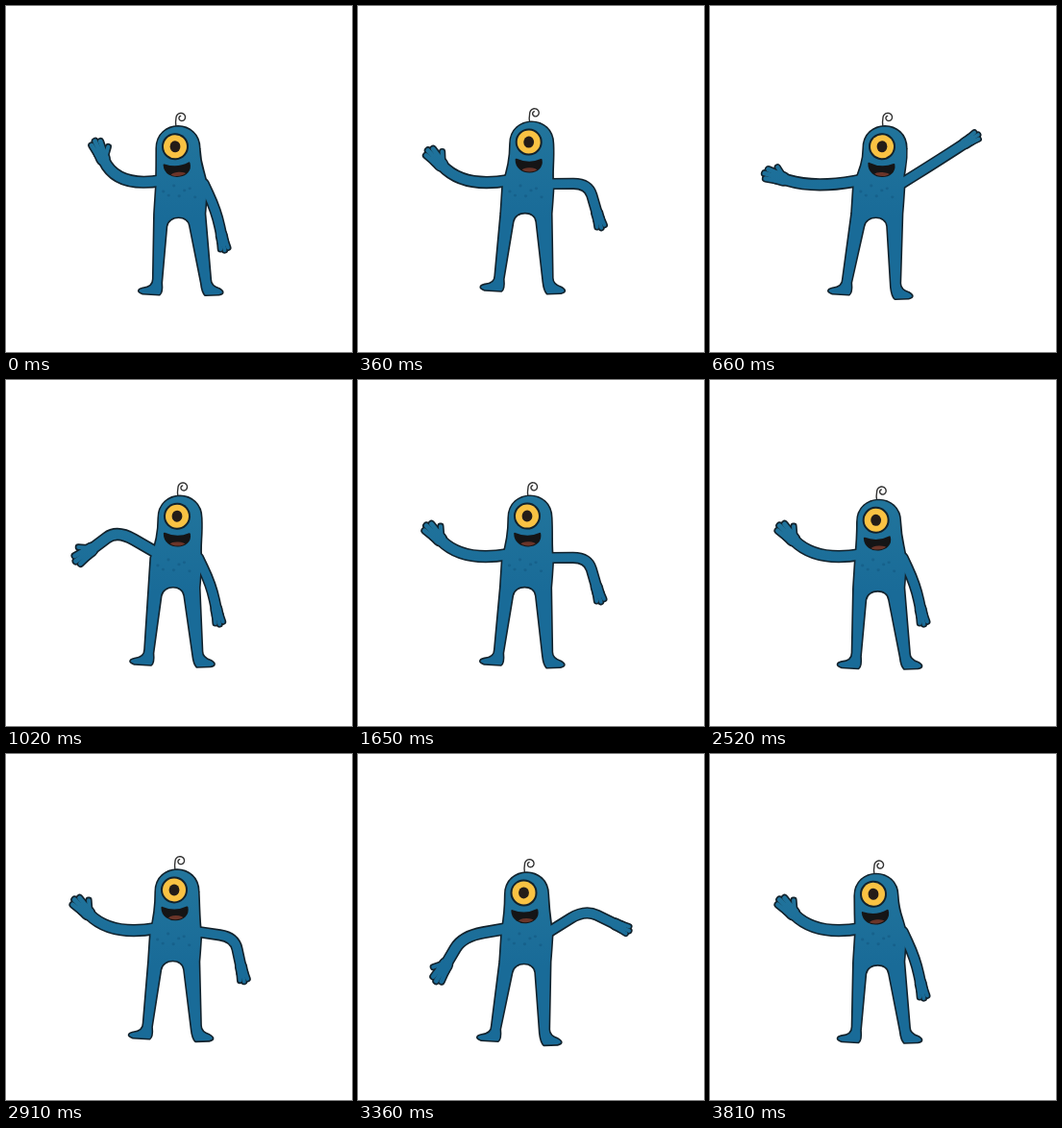
Recreate the animation shown at these times as an HTML page with a canvas. Size 360 by 360 pixels, loop 3870 ms.

```html
<!DOCTYPE html>
<html lang="en">
<head>
<meta charset="utf-8">
<title>Waving monster</title>
<style>
  html, body { margin: 0; width: 100%; height: 100%; overflow: hidden; background: #fff; }
  canvas { display: block; }
</style>
</head>
<body>
<canvas id="stage" width="360" height="360"></canvas>
<script>
const ctx = document.getElementById('stage').getContext('2d');
const LOOP = 3870, SWING = LOOP / 3, STEP = 30;
const INK = '#12222c', YELLOW = '#f9c243', PUPIL = '#241c18';
const BLUE = ctx.createLinearGradient(0, 120, 0, 220);
BLUE.addColorStop(0, '#22759c');
BLUE.addColorStop(1, '#196b98');

// Head sway: time, x
const swayPoints = [[0, 176], [660, 179], [1020, 178], [1650, 176], [2100, 170], [2910, 175], [3810, 170], [LOOP, 170]];

const mix = (a, b, k) => a + (b - a) * k;
const mixPoint = (a, b, k) => [mix(a[0], b[0], k), mix(a[1], b[1], k)];
const rad = degrees => degrees * Math.PI / 180;

function smooth(from, to, v) {
  const k = Math.max(0, Math.min(1, (v - from) / (to - from)));
  return k * k * (3 - 2 * k);
}

// Rises from a to b, falls from c to d.
const pulse = (v, a, b, c, d) => smooth(a, b, v) * (1 - smooth(c, d, v));

function sway(t) {
  const i = swayPoints.findIndex(p => p[0] > t);
  const [t0, x0] = swayPoints[i - 1], [t1, x1] = swayPoints[i];
  return mix(x0, x1, smooth(t0, t1, t));
}

// Three arm swings per loop; body bob and foot shift follow the same phase.
function poseAt(t) {
  const phase = t / SWING % 1;
  const shift = Math.cos(phase * 2 * Math.PI), bob = Math.cos(phase * 4 * Math.PI);
  const settle = 5 * Math.exp(-t / 150);
  const stance = 171.5 + 5 * shift + settle;
  const hip = 174.7 + shift + settle;
  const lift = pulse(phase, .05, .42, .62, .8);
  return {
    x: sway(t), y: 143.8 + 2.4 * bob, hip,
    lx: stance - 44, ly: 298 + 2 * bob,
    rx: stance + 44, ry: 300.5 + 2 * bob - 2 * shift,
    left: {
      side: -1, shoulder: [hip - 16, 181], width: 10,
      upper: rad(10 - 40 * pulse(phase, .62, .78, .8, .95)), upperLength: 50,
      fore: rad(-45 + 115 * pulse(phase, .45, .64, .72, .92) - 4 * settle), foreLength: 34
    },
    right: {
      side: 1, shoulder: [hip + 25, 185], width: 9,
      upper: rad(65 - 97 * lift), upperLength: 31 + 13 * lift,
      fore: rad(78 - 112 * pulse(phase, .25, .5, .5, .7)), foreLength: 26 + 9 * lift
    }
  };
}

function bodyPath({ x, y, hip, lx, ly, rx, ry }) {
  const c = x + 3, crotch = y + 73, p = new Path2D();
  p.moveTo(c - 22, y + 2);
  p.bezierCurveTo(c - 22, y - 28, c + 22, y - 28, c + 22, y + 2);
  p.bezierCurveTo(c + 23, y + 22, hip + 26, 172, hip + 28, 188);
  p.quadraticCurveTo(hip + 27, 205, hip + 26, 216);
  p.lineTo(rx - 13, ry - 16);
  p.quadraticCurveTo(rx - 13, ry - 9, rx - 4, ry - 6);
  p.quadraticCurveTo(rx + 3, ry - 2, rx - 4, ry - .5);
  p.lineTo(rx - 18, ry);
  p.quadraticCurveTo(rx - 21, ry - 3, rx - 22, ry - 12);
  p.lineTo(hip + 11, crotch + 10);
  p.bezierCurveTo(hip + 10, crotch - 3, hip - 12, crotch - 3, hip - 14, crotch + 10);
  p.lineTo(lx + 24, ly - 12);
  p.quadraticCurveTo(lx + 25, ly - 2, lx + 22, ly);
  p.lineTo(lx + 5, ly - 1);
  p.quadraticCurveTo(lx - 3, ly - 4, lx + 5, ly - 6);
  p.quadraticCurveTo(lx + 16, ly - 7, lx + 16, ly - 16);
  p.lineTo(hip - 26, 216);
  p.quadraticCurveTo(hip - 25, 200, hip - 24, 185);
  p.quadraticCurveTo(c - 22, 165, c - 22, y + 2);
  p.closePath();
  return p;
}

// Returns the limb as round strokes: [path, width].
function armStrokes({ side, shoulder, width, upper, upperLength, fore, foreLength }) {
  const reach = (o, angle, len) => [o[0] + side * Math.cos(angle) * len, o[1] + Math.sin(angle) * len];
  const elbow = reach(shoulder, upper, upperLength), wrist = reach(elbow, fore, foreLength);
  const sharp = Math.max(.05, Math.min(.6, .3 + (fore - upper) * .3));
  const sleeve = new Path2D();
  sleeve.moveTo(...shoulder);
  sleeve.lineTo(...mixPoint(shoulder, elbow, sharp));
  sleeve.quadraticCurveTo(...elbow, ...mixPoint(wrist, elbow, sharp));
  sleeve.lineTo(...wrist);

  const dx = side * Math.cos(fore), dy = Math.sin(fore);
  const hand = (u, v) => [wrist[0] + dx * u - dy * v, wrist[1] + dy * u + dx * v];
  const finger = (u0, v0, u1, v1, thickness) => {
    const p = new Path2D();
    p.moveTo(...hand(u0, v0));
    p.lineTo(...hand(u1, v1));
    return [p, thickness];
  };
  const size = side < 0 ? 1.25 : 1;
  const strokes = [[sleeve, width], finger(0, 0, 7, 0, 10 * size)];
  for (const i of [-1, 0, 1]) {
    strokes.push(finger(6, 3 * i * size, (16 - 2 * i * i) * size, 4 * i * size, 3.8 * size));
  }
  if (side < 0) strokes.push(finger(2, 4, 9, 10, 4));
  return strokes;
}

function ellipse(x, y, rx, ry, fill) {
  ctx.beginPath();
  ctx.ellipse(x, y, rx, ry, 0, 0, Math.PI * 2);
  ctx.fillStyle = fill;
  ctx.fill();
}

function drawFace(x, y, tilt) {
  ctx.save();
  ctx.translate(x, y);
  ctx.rotate(tilt);
  ellipse(0, 0, 14, 14, INK);
  ellipse(0, 0, 12, 12, YELLOW);
  ellipse(0, 0, 5.4, 6, PUPIL);

  ctx.beginPath();
  ctx.moveTo(-12.5, 18.5);
  ctx.quadraticCurveTo(1, 24, 13.5, 18);
  ctx.bezierCurveTo(17, 34, -12, 36, -12.5, 18.5);
  ctx.closePath();
  ctx.fillStyle = ctx.strokeStyle = '#151516';
  ctx.lineWidth = 2;
  ctx.fill();
  ctx.stroke();
  ctx.clip();
  ellipse(2, 29.5, 8, 2.8, '#6b3529');
  ctx.restore();
}

function drawAntenna(x, y) {
  ctx.beginPath();
  ctx.moveTo(x + 1, y - 20);
  ctx.quadraticCurveTo(x, y - 25, x + 1, y - 30);
  for (let a = 0; a <= 7.6; a += .2) {
    const r = 5.5 - a * .48;
    ctx.lineTo(x + 6.5 - Math.cos(a) * r, y - 30 - Math.sin(a) * r);
  }
  ctx.strokeStyle = '#303030';
  ctx.lineWidth = 1.4;
  ctx.stroke();
}

function draw(t) {
  const pose = poseAt(t), { x, y, hip } = pose;
  const body = bodyPath(pose);
  const limbs = [...armStrokes(pose.left), ...armStrokes(pose.right)];

  ctx.fillStyle = '#fff';
  ctx.fillRect(0, 0, 360, 360);
  ctx.lineCap = ctx.lineJoin = 'round';
  drawAntenna(x, y);

  const strokeLimbs = (color, extra) => {
    ctx.strokeStyle = color;
    for (const [path, width] of limbs) {
      ctx.lineWidth = width + extra;
      ctx.stroke(path);
    }
  };
  strokeLimbs(INK, 3.2);
  ctx.lineWidth = 3.2;
  ctx.stroke(body);
  ctx.fillStyle = BLUE;
  ctx.fill(body);
  strokeLimbs(BLUE, 0);

  // Faint spots on the belly
  for (let i = 0; i < 7; i++) {
    ellipse(hip - 17 + i * 5.5, 193 + 6 * Math.sin(i * 2.4), 1.6, 1.4, 'rgba(12,70,110,.3)');
  }
  drawFace(x, y, (x - hip) * .012);
}

function tick() {
  const t = performance.now() % LOOP;
  draw(Math.floor(t / STEP) * STEP);
  requestAnimationFrame(tick);
}
tick();
</script>
</body>
</html>
```
